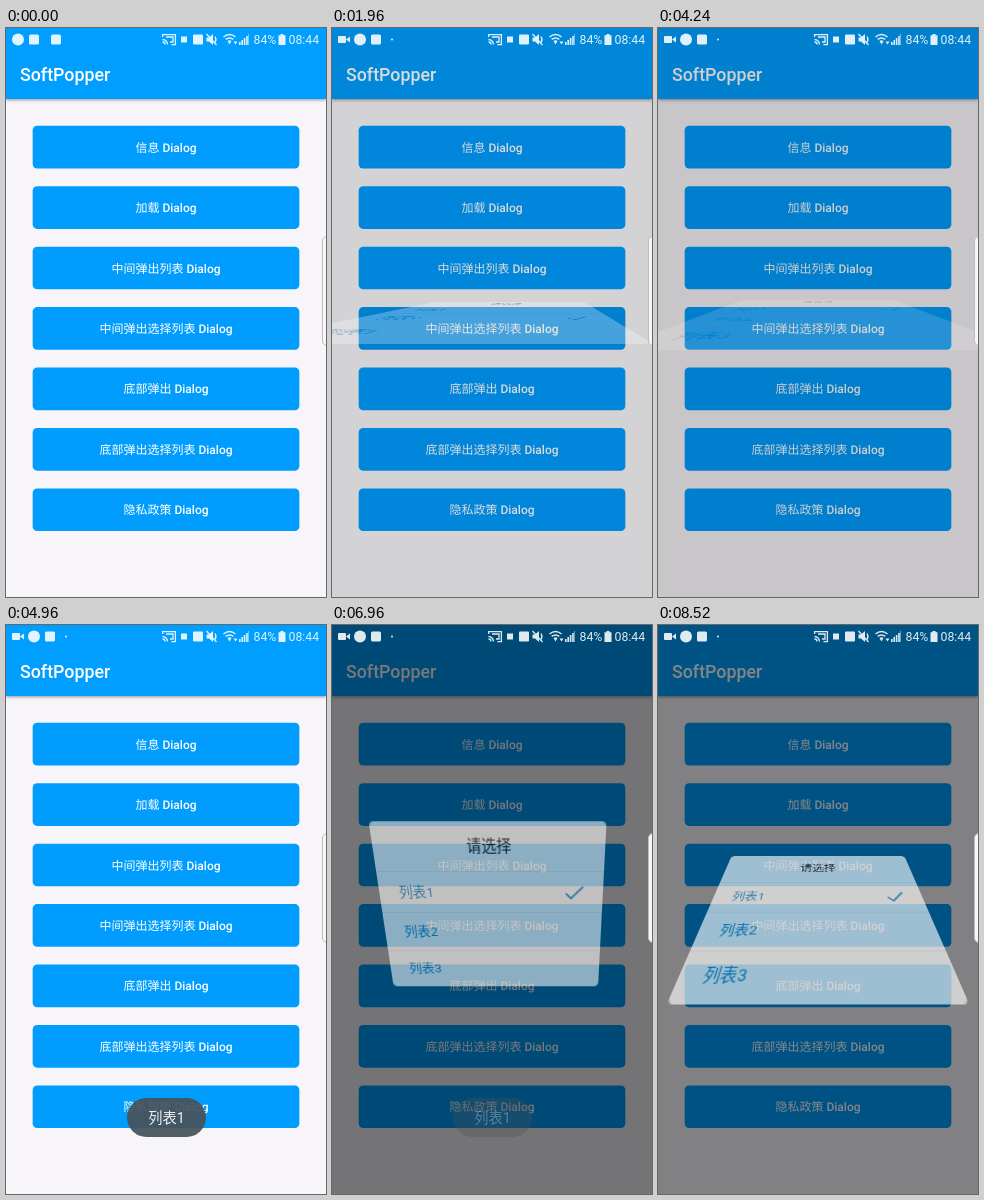
An HTML page that plays this animation: 320x569 px, repeating every 8.6 s.

```html
<!DOCTYPE html>
<html lang="zh-CN">
<head>
<meta charset="utf-8">
<title>Dialog demo</title>
<style>
html, body { margin: 0; width: 100%; height: 100%; overflow: hidden; }
body { font-family: Roboto, "Noto Sans CJK SC", "Noto Sans CJK", sans-serif; }
#stage { position: relative; width: 320px; height: 569px; overflow: hidden; background: #f7f5f9; }
#stage > *, .row, .rule, .check { position: absolute; }
.bar { left: 0; top: 0; width: 320px; height: 71px; background: #009eff; box-shadow: 0 1px 3px rgba(0,0,0,.4); }
.title { left: 14px; top: 35px; line-height: 24px; font-size: 17.78px; font-weight: 500; color: #fff; }
#buttons { left: 0; top: 0; fill: #009dff; }
#buttons text { fill: #fff; font-size: 12px; text-anchor: middle; text-rendering: geometricPrecision; }
#buttons tspan { font-weight: 500; }
#dim { left: 0; top: 0; width: 320px; height: 569px; background: #000; opacity: 0; }
#dialog { left: 50px; top: 201.5px; width: 220px; height: 166px; border-radius: 4.5px; background: #fff; visibility: hidden; }
.head { line-height: 45px; text-align: center; font-size: 14.22px; color: #000; }
.row { left: 19.5px; line-height: 40px; font-size: 13.33px; color: #007dc4; }
.rule { left: 0; width: 220px; height: 1px; background: #ececee; }
.check { left: 182px; width: 20px; height: 16px; }
#toast { left: 121px; top: 473px; width: 79px; height: 39px; line-height: 40px; border-radius: 20px;
  background: rgba(72,82,90,.93); color: #f0f0f0; font-size: 14.22px; text-align: center; opacity: 0; }
.edge { left: 315.5px; top: 208px; width: 12px; height: 110px; border: 1px solid #bdbdc0;
  border-radius: 5px; box-sizing: border-box; background: #f6f5f7; }
#status { left: 0; top: 0; }
#status text { font: 12.3px Roboto, sans-serif; }
</style>
</head>
<body>
<div id="stage">
  <div class="bar"></div>
  <div class="title">SoftPopper</div>
  <svg id="buttons" width="320" height="569"></svg>
  <div id="dim"></div>
  <svg id="status" width="320" height="23" fill="#fff" stroke="none">
    <g opacity=".88">
      <g id="video"><rect x="6" y="8" width="8" height="7" rx="1"/><path d="M14 11.5l4-3v6z"/></g>
      <circle id="app" cy="11.5" r="6"/>
      <rect id="shop" y="6.5" width="10" height="10" rx="1.5"/>
      <rect id="shop2" y="6.5" width="10" height="10" rx="1.5"/>
      <circle id="more" cx="60" cy="11.5" r="1"/>
      <g fill="none" stroke="#fff" stroke-width="1.3">
        <path d="M156.6 9V6.6h12.8v10h-4M156.5 11.5a5 5 0 0 1 5 5M156.5 14a2.5 2.5 0 0 1 2.5 2.5"/>
        <path d="M160 9h7v5h-3"/>
        <path d="M209 8.5q2 3 0 6M200.5 6l10 11"/>
        <path d="M217.5 9q6-5 12 0M219.7 11.4q3.8-3 7.6 0" stroke-width="1.5"/>
      </g>
      <rect x="175" y="8.5" width="6" height="6"/>
      <rect x="187" y="6.5" width="10" height="10" rx="1"/>
      <path d="M200.5 9.5h2.5l4-3.5v11l-4-3.5h-2.5z"/>
      <path d="M221.5 13q2-1.6 4 0l-2 3.5zM227.5 13.5h4l-2 3z"/>
      <path d="M233 14h1.6v3H233zM235.4 12H237v5h-1.6zM237.8 10h1.6v7h-1.6zM240.2 8h1.6v9h-1.6z"/>
      <path d="M242 6h1v11h-1z" opacity=".5"/>
      <path d="M274.5 6h3v1.2h2V17h-7V7.2h2z"/>
      <text x="247.5" y="16">84%</text>
      <text x="282.5" y="16">08:44</text>
    </g>
  </svg>
  <div id="dialog">
    <div class="head">请选择</div>
    <svg class="check" viewBox="0 0 20 16"><path d="M1.5 8.5l5.2 5L18.3 2" fill="none" stroke="#1284c6" stroke-width="1.8"/></svg>
  </div>
  <div id="toast">列表1</div>
  <div class="edge"></div>
</div>
<script>
const LOOP = 8600, FLIP = 1000, CAMERA = 170.7, DIM = 0.6;
const DP = 320 / 360;
const shows = [
  { press: 1400, open: 1840, close: 3496, from: 2, to: 1 },
  { press: 6070, open: 6525, close: 8098, from: 1, to: 1 }
];
const toastIn = 4500, toastOut = 6630;
const labels = ['信息', '加载', '中间弹出列表', '中间弹出选择列表', '底部弹出', '底部弹出选择列表', '隐私政策'];

const $ = id => document.getElementById(id);
const clamp = x => Math.min(1, Math.max(0, x));
const ramp = (t, start, length) => clamp((t - start) / length);
const ease = x => (1 - Math.cos(Math.PI * x)) / 2;

// Evenly spaced values, linear in between.
function along(values, x) {
  const p = x * (values.length - 1);
  const i = Math.min(values.length - 2, Math.floor(p));
  return values[i] + (values[i + 1] - values[i]) * (p - i);
}

function add(parent, className, top, html) {
  const el = document.createElement('div');
  el.className = className;
  el.style.top = top + 'px';
  el.innerHTML = html;
  parent.append(el);
}

const dialog = $('dialog'), check = dialog.querySelector('.check');
const buttonTop = i => (110 + i * 68) * DP;
const rowTop = i => 45.5 + i * 40.4;

const buttonBox = (i, extra = '') =>
  `<rect x="${30 * DP}" y="${buttonTop(i)}" width="${300 * DP}" height="${48 * DP}" rx="4.5" ${extra}/>`;
$('buttons').innerHTML = labels.map((s, i) => buttonBox(i)
  + (i === 3 ? buttonBox(i, 'id="ripple" fill="#000" fill-opacity=".1"') : '')
  + `<text x="160" y="${buttonTop(i) + 25.9}">${s} <tspan>Dialog</tspan></text>`).join('');

for (let i = 0; i < 3; i++) {
  add(dialog, 'rule', rowTop(i) - 1, '');
  add(dialog, 'row', rowTop(i), '列表' + (i + 1));
}

function drawDialog(t) {
  const show = shows.find(s => t >= s.open && t < s.close + FLIP);
  dialog.style.visibility = show ? 'visible' : 'hidden';
  if (!show) {
    $('dim').style.opacity = 0;
    return;
  }
  const closing = t >= show.close;
  const p = ease(ramp(t, closing ? show.close : show.open, FLIP));
  const angle = along(closing ? [0, 90] : [90, -15, 15, 0], p);
  dialog.style.opacity = along(closing ? [1, 0] : [0.25, 0.5, 0.75, 1], p);
  dialog.style.transformOrigin = closing ? '110px 83px' : '164px 83px';
  dialog.style.transform = angle ? `perspective(${CAMERA}px) rotateX(${angle}deg)` : 'none';
  $('dim').style.opacity = DIM * (closing ? 1 - ramp(t, show.close + 290, 667) : ramp(t, show.open, 495));
  check.style.top = rowTop((closing ? show.to : show.from) - 1) + 12 + 'px';
}

function drawStatus(t) {
  const p = ease(ramp(t, 40, 360));
  $('video').setAttribute('transform', `translate(${-20 * (1 - p)} 0)`);
  $('app').setAttribute('cx', 12 + 16 * p);
  $('shop').setAttribute('x', 23 + 16 * p);
  $('shop2').setAttribute('x', 45 + 10 * p);
  $('shop2').setAttribute('opacity', 1 - p);
  $('more').setAttribute('opacity', p);
}

function draw(t) {
  drawStatus(t);
  drawDialog(t);
  $('ripple').style.opacity = Math.max(...shows.map(s =>
    ramp(t, s.press, 70) * (1 - ramp(t, s.open, 250))));
  $('toast').style.opacity = ramp(t, toastIn, 250) * (1 - ramp(t, toastOut, 500));
}

const start = performance.now();
function tick() {
  draw((performance.now() - start) % LOOP);
  requestAnimationFrame(tick);
}
draw(0);
requestAnimationFrame(tick);
</script>
</body>
</html>
```
